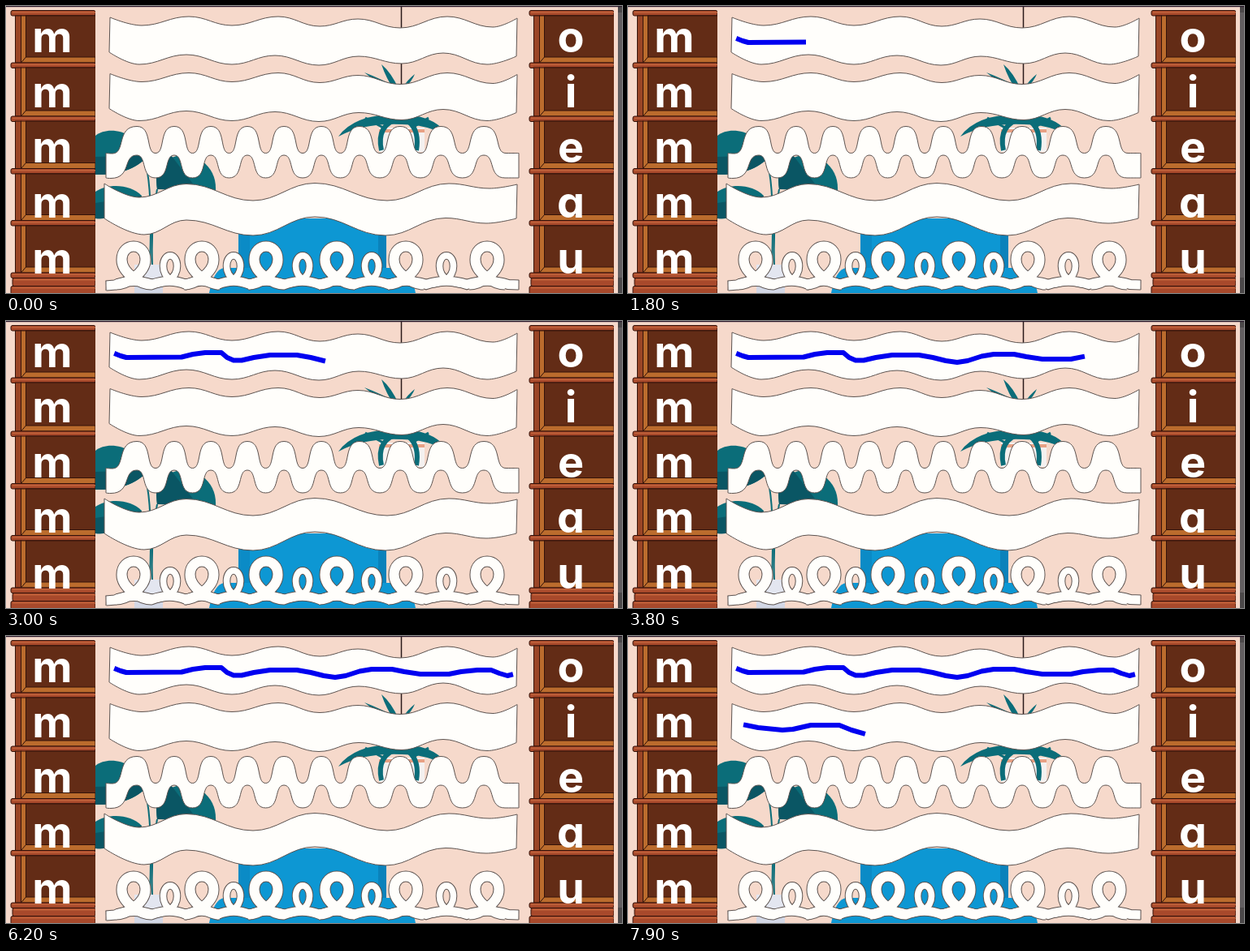
An HTML page that plays this animation: 758x354 px, repeating every 8 s.

```html
<!DOCTYPE html>
<html lang="en">
<head>
<meta charset="utf-8">
<title>Tracing lines</title>
<style>
  html, body { margin: 0; height: 100%; overflow: hidden; background: #f6d9cb; }
  svg { display: block; }
  text { font: 700 54px Inter, "Open Sans", sans-serif; font-feature-settings: "cv11"; fill: #fff; text-anchor: middle; }
  .pen { fill: none; stroke: #0000f0; stroke-width: 6; stroke-linecap: square; stroke-linejoin: round; }
  .paper { fill: #fffefb; stroke: #5c5350; }
  .wood { stroke: #34130a; }
</style>
</head>
<body>
<svg id="stage" width="758" height="354" viewBox="0 0 758 354"></svg>
<script>
const rect = (x, y, w, h, fill, extra = '') =>
  `<rect x="${x}" y="${y}" width="${w}" height="${h}" fill="${fill}" ${extra}/>`;
const path = (d, fill, extra = '') => `<path d="${d}" fill="${fill}" ${extra}/>`;

// Curve through alternating crests and troughs; larger handles make flatter turns.
function edge(points, crest, trough) {
  return points.map(([x, y], i) => {
    if (!i) return `${x},${y}`;
    const [px, py] = points[i - 1], dx = x - px;
    const k1 = i === 1 ? 0 : py < y ? crest : trough;
    const k2 = i === points.length - 1 ? 0 : y < py ? crest : trough;
    return `C${px + dx * k1},${py} ${x - dx * k2},${y} ${x},${y}`;
  }).join(' ');
}

function band(top, bottom, [topCrest, topTrough] = [.4, .4], [lowCrest, lowTrough] = [.4, .4]) {
  const d = `M${edge(top, topCrest, topTrough)}L${edge(bottom.reverse(), lowCrest, lowTrough)}Z`;
  return `<path class="paper" d="${d}"/>`;
}

function shelf(x, letters) {
  const slab = (y, h = 6.5, left = 6) => rect(left, y, 110 - left, h, '#a8492b', 'class="wood" rx="2"') +
    rect(left + 2, y + 1.5, 108 - left, 1.5, '#c2643c');
  const tops = [12, 76, 142, 207, 271], bottoms = [70, 136, 200.5, 264.5, 329];
  const cells = tops.map((y, i) => {
    const end = bottoms[i];
    return rect(11.5, y, 7, end - y, '#9a4526', 'class="wood"') +
      rect(18.5, y, 91.5, end - y, '#bb6c2d', 'class="wood"') +
      rect(24.5, y, 86, end - y - 7, '#632c16', 'class="wood"') +
      path(`M18.5,${end}l6-7`, 'none', 'class="wood"') + slab(end) +
      `<text x="57" y="${56.5 + 68.3 * i}">${letters[i]}</text>`;
  }).join('');
  return `<svg x="${x}" width="110" height="354">${slab(5.5)}${cells}${slab(335.5, 10, 8)}${slab(345.5, 10)}</svg>`;
}

function room() {
  const leaf = '#0b6d79', shade = '#0a5664';
  const blade = (d, w = 4) => path(d, 'none', `stroke="${leaf}" stroke-width="${w}"`);
  return rect(0, 0, 758, 354, '#f6d9cb') +
    // potted plant
    path('M110,160C126,147 160,154 175,184C160,204 130,209 110,208Z', leaf) +
    path('M110,186L175,184C160,204 130,209 110,208Z', shade) +
    path('M186,226C182,198 200,180 226,185C246,189 259,206 258,227Z', leaf) +
    path('M186,226C182,198 190,190 203,184L236,227Z', shade) +
    path('M110,229C126,218 154,220 167,234C160,254 132,264 110,262Z', leaf) +
    path('M110,243L167,234C160,254 132,264 110,262Z', shade) +
    blade('M174,205Q180,240 177,320', 2) + blade('M186,226Q178,270 180,320', 2) +
    rect(158, 319, 35, 35, '#e3e6f0') + rect(158, 346, 35, 8, '#d3d8e6') +
    // hanging plant
    path('M486.5,0V140', 'none', 'stroke="#2b1a1a" stroke-width="1.5"') +
    rect(459, 150, 56, 30, '#f4f1f0') + rect(459, 152, 56, 4, '#e8a184') +
    path('M484,102Q462,90 441,82Q455,94 480,106ZM483,102Q474,82 462,72Q468,90 478,104ZM490,102Q500,92 503,84Q495,90 487,102Z', leaf) +
    path('M487,134Q430,132 409,161Q440,144 487,146ZM487,134Q528,134 546,162Q520,146 487,146Z', leaf) +
    blade('M485,138Q455,146 462,178', 6) + blade('M488,138Q510,148 505,178', 6) +
    blade('M442,138L464,150M520,138L500,150', 3) +
    // chair
    rect(286, 262, 182, 70, '#0d97d3') + rect(286, 270, 14, 54, '#0b8bc6') + rect(458, 270, 10, 54, '#0a82bb') +
    path('M250,354Q256,323 270,323H484Q498,323 504,354Z', '#0d97d3');
}

const wave = dy => band(
  [[128, 14], [167, 24], [225, 13], [278, 24], [335, 13], [386, 25], [433, 16], [485, 27], [543, 13], [599, 26], [629, 15]].map(([x, y]) => [x, y + dy]),
  [[127, 57], [164, 72], [222, 60], [278, 72], [331, 61], [385, 73], [434, 62], [487, 71], [538, 58], [592, 72], [628, 62]].map(([x, y]) => [x, y + dy]));

function arches() {
  const crests = [161, 207, 252, 297, 342, 388, 435, 485, 535, 588];
  const line = (high, low, first, last) => crests.flatMap((x, i) =>
    [[x, high], [i < 9 ? (x + crests[i + 1]) / 2 : last, low]]).toSpliced(0, 0, [123, low], [first, low + .5]).concat([[631, low]]);
  return band(line(148.5, 181.5, 131, 615), line(184, 212, 129, 614), [.85, .55], [.55, .8]);
}

function loops() {
  const centers = [157, 202, 241, 280, 320, 365, 407, 450, 492, 542, 592];
  const mids = centers.map((x, i) => i < 10 ? (x + centers[i + 1]) / 2 : 618);
  const base = 'M123,345L134,344' + centers.map((x, i) => `Q${x},335 ${mids[i]},343.5`).join('') + 'L631,344';
  const strokes = [[base, 11.5]].concat(centers.map((x, i) => {
    const [w, y, top, width] = i % 2 ? [8.5, 321, 303.5, 8] : [14.5, 313, 291, 12.5];
    return [`M${x - 22},343.5C${x - 8},343 ${x + w},${y + 16} ${x + w},${y}C${x + w},${top} ${x - w},${top} ${x - w},${y}` +
      `C${x - w},${y + 16} ${x + 8},343 ${x + 22},343.5`, width];
  }));
  const pass = (color, extra) => strokes.map(([d, w]) =>
    path(d, 'none', `stroke="${color}" stroke-width="${w + extra}"`)).join('');
  return pass('#5c5350', 1.6) + pass('#fffefb', -.4) + path('M123,339v12M631,338v12', 'none', 'stroke="#5c5350"');
}

const swell = band(
  [[121, 219], [164, 236], [222, 219.5], [304, 240], [380, 218.5], [469, 240], [545, 219], [595, 225], [629, 220]],
  [[121, 262], [170, 282], [222, 264], [304, 283], [380, 260], [467, 283], [541, 261.5], [591, 268], [628, 262]]);

document.getElementById('stage').innerHTML = room() + wave(0) + wave(69.5) + arches() + swell + loops() +
  shelf(0, 'mmmmm') + shelf(638, 'oieau') +
  rect(753, 0, 5, 354, '#4b4849') + rect(753, 8, 5, 327, '#625e60') +
  rect(0, 0, 758, 1.2, '#2b1a2c') +
  '<polyline class="pen"/><polyline class="pen"/>';

// Pen lines: the points drawn, and the pen's x position over time.
const pens = [
  {
    points: [[136, 41], [141, 43], [148, 45], [216, 44.5], [230, 41], [245, 39], [265, 39], [272, 45], [280, 48.5], [290, 48.5],
      [305, 45], [325, 42], [358, 42], [375, 45], [391, 49], [405, 51], [418, 49], [435, 43.5], [450, 41], [475, 41],
      [490, 44], [510, 47], [545, 47], [560, 44], [580, 42], [597, 42], [607, 46], [617, 49], [621, 48]],
    keys: [[1200, 136], [1800, 216], [3000, 390], [3300, 428], [3800, 559], [4200, 614], [4300, 621]],
  },
  {
    points: [[145, 110], [160, 113], [190, 116], [203, 115], [225, 110], [260, 110], [275, 116], [289, 120]],
    keys: [[7000, 145], [7900, 289]],
  },
];
const lines = document.querySelectorAll('.pen');

function interpolate(pairs, at) {
  const i = pairs.findIndex(([a]) => a >= at);
  if (i < 0) return pairs.at(-1)[1];
  if (!i) return pairs[0][1];
  const [a, b] = pairs[i - 1], [c, d] = pairs[i];
  return b + (d - b) * (at - a) / (c - a);
}

function draw(now) {
  const time = Math.floor(now % 8000 / 100) * 100;
  pens.forEach(({ points, keys }, i) => {
    const x = interpolate(keys, time);
    const drawn = x > points[0][0] ? [...points.filter(p => p[0] < x), [x, interpolate(points, x)]] : [];
    lines[i].setAttribute('points', drawn.join(' '));
  });
  requestAnimationFrame(draw);
}
draw(performance.now());
</script>
</body>
</html>
```
